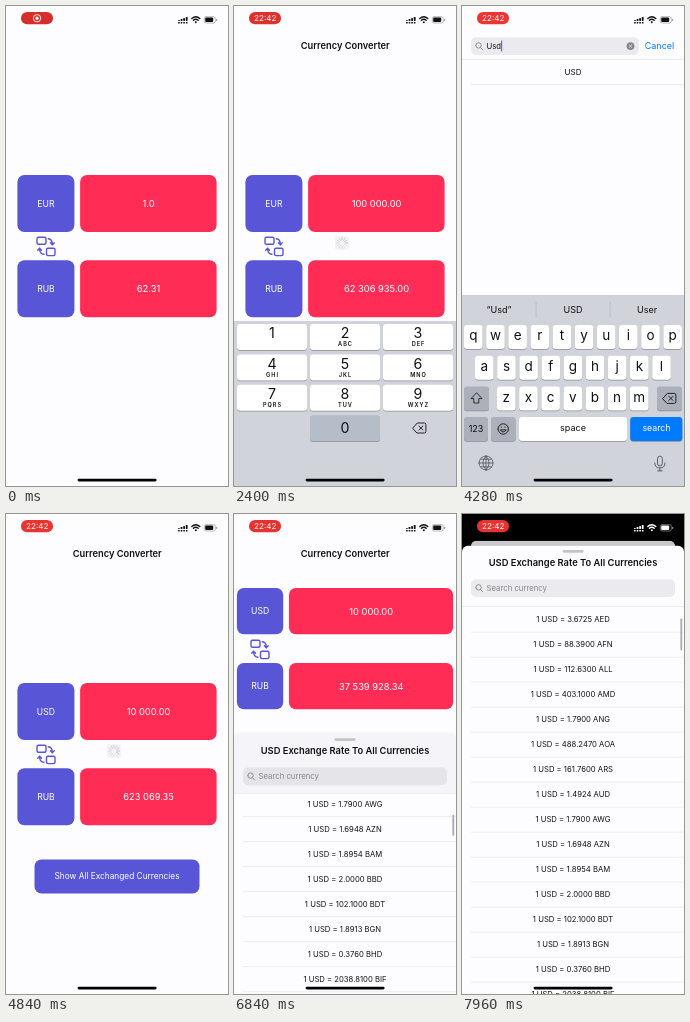
Recreate the animation shown at these times as an HTML page with a canvas. Size 222 by 480 pixels, loop 8000 ms.

```html
<!DOCTYPE html>
<html lang="en">
<head>
<meta charset="utf-8">
<title>Currency Converter</title>
<style>
  html, body { margin: 0; width: 100%; height: 100%; overflow: hidden; background: #fdfcff; }
  canvas { display: block; width: 100%; height: 100%; }
</style>
</head>
<body>
<canvas id="stage"></canvas>
<script>
const W = 222, H = 480, LOOP = 8000;
const BG = '#fdfcff', VIOLET = '#5856d6', RED = '#ff2d55', BLUE = '#007aff', LINE = '#e3e2e6', GRAY = '#85858b';
const canvas = document.getElementById('stage');
const ctx = canvas.getContext('2d');
const ratio = Math.max(1, window.devicePixelRatio || 1);
canvas.width = W * ratio;
canvas.height = H * ratio;

const RATES = ('AED 3.6725,AFN 88.3900,ALL 112.6300,AMD 403.1000,ANG 1.7900,AOA 488.2470,ARS 161.7600,' +
  'AUD 1.4924,AWG 1.7900,AZN 1.6948,BAM 1.8954,BBD 2.0000,BDT 102.1000,BGN 1.8913,BHD 0.3760,' +
  'BIF 2038.8100,BMD 1.0000,BND 1.3800,BOB 6.8900,BRL 5.4400,BSD 1.0000,BTN 79.2000,BWP 12.7000,' +
  'BYN 2.5200,BZD 2.0000,CAD 1.2900,CDF 1995.0000,CHF 0.9700,USD 1.0000').split(',').map(r => r.split(' '));

const EUR_STEPS = [[0, 1], [560, 10], [800, 100], [1000, 1e3], [1240, 1e4],
  [2200, 1e5], [2480, 1e6], [2640, 1e5], [2740, 1e4]];
const RUB_STEPS = [[0, 62.306935], [680, 623.06935], [920, 6230.6935], [1120, 62306.9351], [1360, 623069.35],
  [2080, 6230693.5], [2340, 62306935], [2560, 6230693.5], [2680, 623069.35], [5240, 37539928.34]];
const QUERY_STEPS = [[0, ''], [3720, 'U'], [3880, 'Us'], [4080, 'Usd']];
const SCROLL = [[6480, 0], [6840, 203], [7000, 230], [7200, 230], [7500, 0]];
const ZERO_TAPS = [560, 800, 1000, 1240, 2080, 2340];
const LOADING = [[560, 680], [800, 920], [1000, 1120], [1240, 1360], [2080, 2200], [2340, 2480], [4640, 5240]];

const lerp = (a, b, u) => a + (b - a) * u;
const within = (t, a, b) => t >= a && t < b;
const blinkOn = t => (t + 100) % 800 < 450;
const stepAt = (steps, t) => steps.filter(s => s[0] <= t).pop()[1];
const money = n => n.toFixed(2).replace(/\B(?=(\d{3})+\.)/g, ' ');
function ease(t, a, b) {
  const u = Math.min(1, Math.max(0, (t - a) / (b - a)));
  return 1 - (1 - u) ** 3;
}
const track = (points, t) => points.slice(1).reduce(
  (v, [time, value], i) => lerp(v, value, ease(t, points[i][0], time)), points[0][1]);

function text(str, x, y, size, color = '#fff', weight = 400, align = 'center') {
  ctx.font = `${weight} ${size}px Inter, Roboto, sans-serif`;
  ctx.textAlign = align;
  ctx.textBaseline = 'middle';
  ctx.fillStyle = color;
  ctx.fillText(str, x, y + 0.7);
  return ctx.measureText(str).width;
}
function box(x, y, w, h, r, color) {
  ctx.fillStyle = color;
  ctx.beginPath();
  ctx.roundRect(x, y, w, h, r);
  ctx.fill();
}
function stroke(d, color, width = 1) {
  ctx.strokeStyle = color;
  ctx.lineWidth = width;
  ctx.lineCap = ctx.lineJoin = 'round';
  ctx.stroke(new Path2D(d));
}
function disc(x, y, r, color) {
  box(x - r, y - r, 2 * r, 2 * r, r, color);
}
function shifted(x, y, draw) {
  ctx.save();
  ctx.translate(x, y);
  draw();
  ctx.restore();
}
function rule(y, x = 9) {
  ctx.fillStyle = LINE;
  ctx.fillRect(x, y, W - x, 0.6);
}

function statusBar(t, color) {
  const glow = 0.5 - 0.5 * Math.cos(t / 1480 * Math.PI);
  box(15, 6, 32, 12.3, 6.1, `rgb(${lerp(215, 240, glow)},${lerp(46, 52, glow)},${lerp(44, 50, glow)})`);
  if (t < 440) {
    ctx.strokeStyle = '#fff';
    ctx.lineWidth = 0.9;
    ctx.beginPath();
    ctx.arc(31, 12.2, 3.7, 0, 7);
    ctx.stroke();
    disc(31, 12.2, 1.6, '#fff');
  } else text('22:42', 31.2, 11.8, 8.1);
  for (let i = 0; i < 4; i++) {
    box(172 + i * 2.6, 14 - i, 1.8, 1 + i, 0.4, color);
    box(172 + i * 2.6, 16, 1.8, 1.5, 0.4, color);
  }
  stroke('M185.8 12.6Q189.8 8.8 193.8 12.6M187.4 14.3Q189.8 12 192.2 14.3', color, 1.4);
  disc(189.8, 16.2, 1, color);
  stroke('M200 10.7H207.5Q209.3 10.7 209.3 12.5V15.2Q209.3 17 207.5 17H200Q198.3 17 198.3 15.2V12.5Q198.3 10.7 200 10.7', '#99999d', 0.7);
  box(199.2, 11.6, 8, 4.5, 1, color);
  box(210.1, 12.8, 1, 2.2, 0.5, '#99999d');
}

function swapIcon(cx, cy) {
  shifted(cx - 40, cy - 240, () => {
    stroke('M32 231H38.5Q40 231 40 232.5V236.5Q40 238 38.5 238H32.5Q31 238 31 236.5V232.5Q31 231 32.5 231' +
      'M42.2 242H47.5Q49 242 49 243.5V247.8Q49 249.3 47.5 249.3H42Q40.5 249.3 40.5 247.8V243.5Q40.5 242 42 242' +
      'M42.3 232.5Q46.3 232.7 46.3 238.2M44.4 236.5L46.3 238.6L48.2 236.5' +
      'M38 248Q33.6 247.8 33.6 242.2M31.7 244L33.6 241.8L35.5 244', VIOLET, 1.4);
  });
}

function spinner(t) {
  box(101, 230, 14, 14, 2, '#f4f3f6');
  for (let i = 0; i < 12; i++) {
    const a = i * Math.PI / 6, c = Math.cos(a), s = Math.sin(a);
    const age = (Math.floor(t / 40) - i + 120) % 12;
    stroke(`M${108 + 3 * c} ${237 + 3 * s}L${108 + 5.6 * c} ${237 + 5.6 * s}`,
      `rgba(150,150,158,${0.55 - age * 0.035})`, 1);
  }
}

function caret(x, y) {
  box(Math.round(x), y - 5.5, 1.2, 11, 0, '#3b78ff');
}

function converter(t) {
  const p = ease(t, 5960, 6180);
  const margin = lerp(11.4, 2.9, p), side = lerp(57, 46.3, p), fieldX = margin + side + 5.7, fieldEnd = W - margin;
  const rows = [
    [t < 4440 ? 'EUR' : 'USD', t < 560 ? '1.0' : money(stepAt(EUR_STEPS, t)), lerp(169, 74, p), t < 1720],
    ['RUB', money(stepAt(RUB_STEPS, t)), lerp(254.2, 149, p), within(t, 1900, 2780)]
  ];
  ctx.fillStyle = BG;
  ctx.fillRect(0, 0, W, H);
  if (t >= 80) {
    text('Currency Converter', 111.2, 39.3, 9.3, '#111', 600);
    box(28.5, 345.5, 165, 34, 7, VIOLET);
    text('Show All Exchanged Currencies', 111, 362.3, 8.3, within(t, 5800, 5860) ? '#b0afea' : '#fff');
  }
  for (const [code, amount, y, focused] of rows) {
    box(margin, y, side, side, 7, VIOLET);
    box(fieldX, y, fieldEnd - fieldX, side, 7, RED);
    text(code, margin + side / 2, y + side / 2, 8.6);
    const cx = (fieldX + fieldEnd) / 2 + 0.2, width = text(amount, cx, y + side / 2, 9.3);
    if (focused && blinkOn(t)) caret(cx + width / 2, y + side / 2);
  }
  swapIcon(lerp(40, 26, p), lerp(240.3, 135.3, p));
  if (LOADING.some(([a, b]) => within(t, a + 20, b))) spinner(t);
}

function key(x, y, w, h, color = '#fff') {
  box(x, y + 0.8, w, h, 3, '#8b8d93');
  box(x, y, w, h, 3, color);
}
function backspace(cx, cy) {
  stroke(`M${cx - 6.6} ${cy}l4.4 -5h7q1.6 0 1.6 1.6v6.8q0 1.6 -1.6 1.6h-7z` +
    `M${cx - 0.6} ${cy - 2}l4 4m0 -4l-4 4`, '#222', 1);
}

function numberPad(t) {
  ctx.fillStyle = '#d1d3da';
  ctx.fillRect(0, 315, W, H);
  const letters = ['', 'ABC', 'DEF', 'GHI', 'JKL', 'MNO', 'PQRS', 'TUV', 'WXYZ'];
  letters.forEach((label, i) => {
    const x = 3 + i % 3 * 73, y = 318 + Math.floor(i / 3) * 30.4;
    key(x, y, 70, 26);
    text(i + 1, x + 35, y + 9.3, 14.2, '#111');
    ctx.letterSpacing = '1px';
    text(label, x + 35.5, y + 20, 5.6, '#111', 600);
    ctx.letterSpacing = '0px';
  });
  key(76, 409.2, 70, 26, ZERO_TAPS.some(a => within(t, a, a + 100)) ? '#b5bdc9' : '#fff');
  text('0', 111, 422, 14.2, '#111');
  backspace(185.5, 422);
}

function letterKeyboard() {
  ctx.fillStyle = '#d1d3da';
  ctx.fillRect(0, 289, W, H);
  ['“Usd”', 'USD', 'User'].forEach((word, i) => text(word, 37 + i * 74, 303.5, 9, '#111'));
  ctx.fillStyle = '#b6b8bf';
  ctx.fillRect(73.7, 296, 0.7, 16);
  ctx.fillRect(147.7, 296, 0.7, 16);
  [['qwertyuiop', 2], ['asdfghjkl', 13], ['zxcvbnm', 35]].forEach(([row, left], r) =>
    [...row].forEach((letter, i) => {
      const x = left + i * 22.15, y = 319 + r * 30.7;
      key(x, y, 18.6, 24);
      text(letter, x + 9.3, y + 10.4, 13.5, '#111');
    }));
  const dark = '#abb0ba';
  key(2, 380.4, 25, 24, dark);
  stroke('M14.3 387L9 392.6H11.8V397H16.8V392.6H19.6Z', '#222', 0.9);
  key(195, 380.4, 25, 24, dark);
  backspace(207.5, 392.4);
  key(2, 411, 24, 24, dark);
  text('123', 14, 422.5, 9, '#111');
  key(29, 411, 24.5, 24, dark);
  stroke('M36 423a5.2 5.2 0 1 0 10.4 0a5.2 5.2 0 1 0 -10.4 0M39.4 421v.2M43 421v.2M38.4 424.2Q41.2 428 44 424.2Z', '#222', 1);
  key(57, 411, 108, 24);
  text('space', 111, 422, 9, '#111');
  key(168.3, 411, 52, 24, BLUE);
  text('search', 194.5, 422, 8.8);
  stroke('M17 457a7 7 0 1 0 14 0a7 7 0 1 0 -14 0M24 450v14M17 457h14M24 450q-6.5 7 0 14M24 450q6.5 7 0 14M18.8 453.2h10.4M18.8 460.8h10.4', '#50535a', 0.8);
  stroke('M195.5 452.5a2.4 2.4 0 0 1 4.8 0v5a2.4 2.4 0 0 1 -4.8 0zM192.8 457q0 5 5.1 5t5.1 -5M197.9 462v2.8M195.6 464.8h4.6', '#50535a', 0.9);
}

function searchField(y, w, query, focused) {
  box(9, y, w, 17.8, 5, 'rgba(118,118,128,.13)');
  stroke(`M13.8 ${y + 8.2}a2.7 2.7 0 1 0 5.4 0a2.7 2.7 0 1 0 -5.4 0M18.5 ${y + 10.3}l2.2 2.3`, GRAY, 0.9);
  const width = text(query || 'Search currency', 24.5, y + 8.5, 7.75, query ? '#111' : GRAY, 400, 'left');
  if (focused) caret(24.5 + (query ? width : 0), y + 8.9);
  if (query) {
    const cx = w + 0.5;
    disc(cx, y + 8.9, 3.9, GRAY);
    stroke(`M${cx - 1.4} ${y + 7.5}l2.8 2.8m0 -2.8l-2.8 2.8`, '#ebeaee', 0.8);
  }
}

function picker(t) {
  const focus = ease(t, 3420, 3560), query = stepAt(QUERY_STEPS, t);
  ctx.fillStyle = BG;
  ctx.fillRect(0, 0, W, H);
  searchField(31.2, lerp(203, 168, focus), query, t > 3420 && blinkOn(t));
  if (focus > 0) text('Cancel', lerp(240, 197.5, focus), 39.8, 9, BLUE);
  rule(53, 0);
  RATES.map(r => r[0]).filter(code => code.includes(query.toUpperCase())).forEach((code, i) => {
    if (t > 4360) box(0, 53.6, W, 24.6, 0, '#dcdce0');
    text(code, 111, 65.6 + i * 25, 8, '#111');
    rule(78 + i * 25);
  });
  if (focus > 0) shifted(0, 191 * (1 - focus), letterKeyboard);
}

function rateSheet(t, top) {
  const scroll = track(SCROLL, t), tint = Math.min(1, scroll / 12);
  const listTop = top + 60.4 - tint;
  ctx.save();
  ctx.shadowColor = 'rgba(0,0,0,.07)';
  ctx.shadowBlur = 5 * ratio;
  box(0, top, W, H, [6, 6, 0, 0], BG);
  ctx.restore();
  // the header turns translucent grey once rows slide beneath it
  box(0, top, W, listTop - top, [6, 6, 0, 0], `rgba(120,118,130,${0.06 * tint})`);
  box(100.5, top + 4.2, 21, 2.8, 1.4, '#c3c2c7');
  text('USD Exchange Rate To All Currencies', 111, top + 16.6, 9.35, '#111', 600);
  searchField(top + 33.4, 204, '', false);
  ctx.save();
  ctx.beginPath();
  ctx.rect(0, listTop, W, H);
  ctx.clip();
  RATES.forEach(([code, rate], i) => {
    const y = top + 73.4 + i * 25 - scroll;
    text(`1 USD = ${rate} ${code}`, 111, y, 7.7, '#111');
    rule(y + 12.6);
  });
  ctx.restore();
  rule(listTop, 0);
  if (t > 6480) box(218.4, top + 72.6 + scroll * 0.04, 1.8, lerp(21, 32, (220 - top) / 188.2), 0.9, '#aaa9ae');
}

function render(t) {
  ctx.setTransform(ratio, 0, 0, ratio, 0, 0);
  const expand = ease(t, 7600, 7860);
  ctx.fillStyle = '#000';
  ctx.fillRect(0, 0, W, H);
  ctx.save();
  if (expand > 0) {
    const scale = 1 - 0.08 * expand;
    ctx.translate(W * (1 - scale) / 2, 26.8 * expand);
    ctx.scale(scale, scale);
    ctx.beginPath();
    ctx.roundRect(0, 0, W, H, 6 * expand);
    ctx.clip();
  }
  converter(t);
  ctx.fillStyle = `rgba(0,0,0,${0.2 * expand})`;
  ctx.fillRect(0, 0, W, H);
  ctx.restore();

  const pad = ease(t, 60, 220) - ease(t, 1720, 1860) + ease(t, 1900, 2040) - ease(t, 2780, 2900);
  if (pad > 0) shifted(0, 165 * (1 - pad), () => numberPad(t));
  const cover = ease(t, 2980, 3160) - ease(t, 4440, 4620);
  if (cover > 0) shifted(0, H * (1 - cover), () => picker(t));
  const rise = ease(t, 5960, 6180);
  if (rise > 0) rateSheet(t, lerp(lerp(H, 220, rise), 31.8, expand));

  statusBar(t, expand > 0.4 ? '#fff' : '#111');
  box(71.6, 472.7, 79, 2.8, 1.4, '#000');
}

function tick(now) {
  render(now % LOOP);
  requestAnimationFrame(tick);
}
requestAnimationFrame(tick);
</script>
</body>
</html>
```
